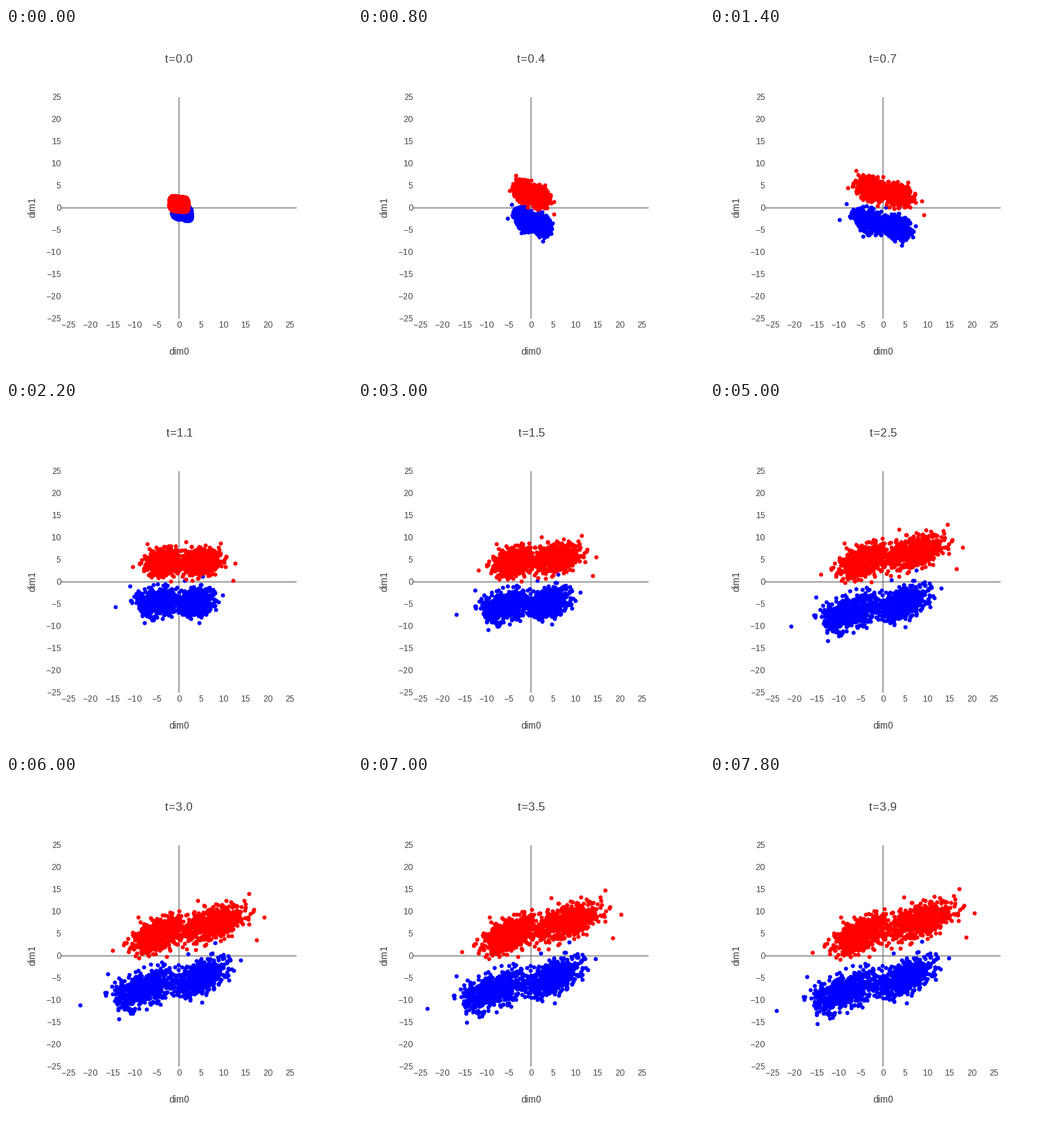
A matplotlib script for the animation above (8000 ms loop, 500 by 500 pixels).

```python
import numpy as np
import matplotlib.pyplot as plt
from matplotlib.animation import FuncAnimation

plt.rcParams["font.family"] = "Liberation Sans"
plt.rcParams["text.hinting"] = "force_autohint"
plt.rcParams["text.hinting_factor"] = 1

SIZE, DPI, UNIT = 500, 100, 6.4
PX = 72 / DPI
INK = "#444444"
FRAMES, INTERVAL = 40, 200
SPREAD_END, KINK, END = 0.7, 1.2, 3.9
rng = np.random.default_rng(11)


def lump(centre, spread, corr, count=700):
    z = rng.standard_normal((count, 2))
    z = z[np.hypot(*z.T) < 2.9]
    mix = np.array([[1, 0], [corr, np.sqrt(1 - corr**2)]])
    return centre + z @ mix.T * spread


def start_blob(points, centre, radii, shear):
    """Squeeze a cloud into a small rounded patch, keeping its layout."""
    d = points - points.mean(axis=0)
    z = d @ np.linalg.inv(np.linalg.cholesky(np.cov(d.T))).T
    r = np.hypot(*z.T) + 1e-9
    unit = z / r[:, None]
    reach = np.sqrt(1 - np.exp(-r**2 / 2)) / (unit**4).sum(axis=1) ** 0.25
    q = unit * reach[:, None] * radii
    q[:, 1] += shear * q[:, 0]
    return q + centre


def flow(p):
    """Final place of a spread-out point; the field bends at x = 0."""
    x, y = p.T
    inner = np.c_[2.22 * x + 0.55 * y - 0.66, 0.88 * x + 1.665 * y + 0.2]
    outer = np.c_[2.40 * x + 0.94 * y - 1.94, 0.745 * x + 1.85 * y + 0.17]
    return np.where(x[:, None] < 0, inner, outer)


def group(sign, strays, centre, radii, shear):
    """Start, spread and final places; sign -1 mirrors through the origin."""
    cloud = np.vstack([lump((-3.1, 4.4), (1.35, 1.2), -0.25),
                       lump((3.1, 2.9), (1.55, 1.2), -0.3),
                       sign * np.array(strays)])
    mid = sign * cloud
    return start_blob(mid, centre, radii, shear), mid, sign * flow(cloud)


red = group(1, [(-8, 4.6), (-6.1, 8.4), (-1.2, 0.4), (8.8, 1.6),
                (9.2, -1.5), (5.7, 5.8), (0, 7.1)],
            (-0.1, 0.95), (2.3, 1.7), -0.1)
blue = group(-1, [(-9.8, -2.6), (-8.3, 0.9), (-4.5, -6.4), (7.4, -4.1),
                  (3.6, 0.2), (4.2, -8.5), (0.7, 0.1)],
             (0.65, -1.05), (2.35, 1.6), -0.18)


def positions(poses, t):
    start, mid, end = poses
    if t <= SPREAD_END:
        u = t / SPREAD_END
        p = start + (mid - start) * [u**1.45, 1 - (1 - u) ** 2]
    else:
        if t < KINK:
            s = 0.4 * (t - SPREAD_END) / (KINK - SPREAD_END)
        else:
            s = 1 - 0.6 * ((END - t) / (END - KINK)) ** 1.45
        p = mid + (end - mid) * s
    return np.c_[250 + UNIT * p[:, 0], 260 - UNIT * p[:, 1]]


fig = plt.figure(figsize=(SIZE / DPI, SIZE / DPI), dpi=DPI, facecolor="white")
ax = fig.add_axes([0, 0, 1, 1])
ax.set(xlim=(0, SIZE), ylim=(SIZE, 0))
ax.axis("off")


def label(x, y, text, px, ha="center", **kw):
    return ax.text(x, y, text, fontsize=px * PX, color=INK, ha=ha,
                   va="baseline", **kw)


for xs, ys in [((80, 420), (260, 260)), ((250, 250), (100, 420))]:
    ax.plot(xs, ys, color=INK, lw=PX, solid_capstyle="butt", snap=False,
            zorder=1)

for v in range(-25, 26, 5):
    name = str(v).replace("-", "\u2212")
    label(250 + UNIT * v, 433, name, 12)
    label(79, 104 + UNIT * (25 - v), name, 12, ha="right")

label(250, 472, "dim0", 14)
label(42, 259.5, "dim1", 14, rotation=90, rotation_mode="anchor")
title = label(250, 50, "t=0.0", 17)


def dots(color, z):
    return ax.scatter([], [], s=(6 * PX) ** 2, c=color, linewidths=0, zorder=z)


layers = [(dots("#0000ff", 2), blue), (dots("#ff0000", 3), red)]


def draw(i):
    t = i / 10
    title.set_text(f"t={t:.1f}")
    for dot, poses in layers:
        dot.set_offsets(positions(poses, t))
    return [title] + [dot for dot, _ in layers]


anim = FuncAnimation(fig, draw, frames=FRAMES, interval=INTERVAL,
                     init_func=lambda: draw(0), repeat=True, repeat_delay=0)
plt.show()
```
